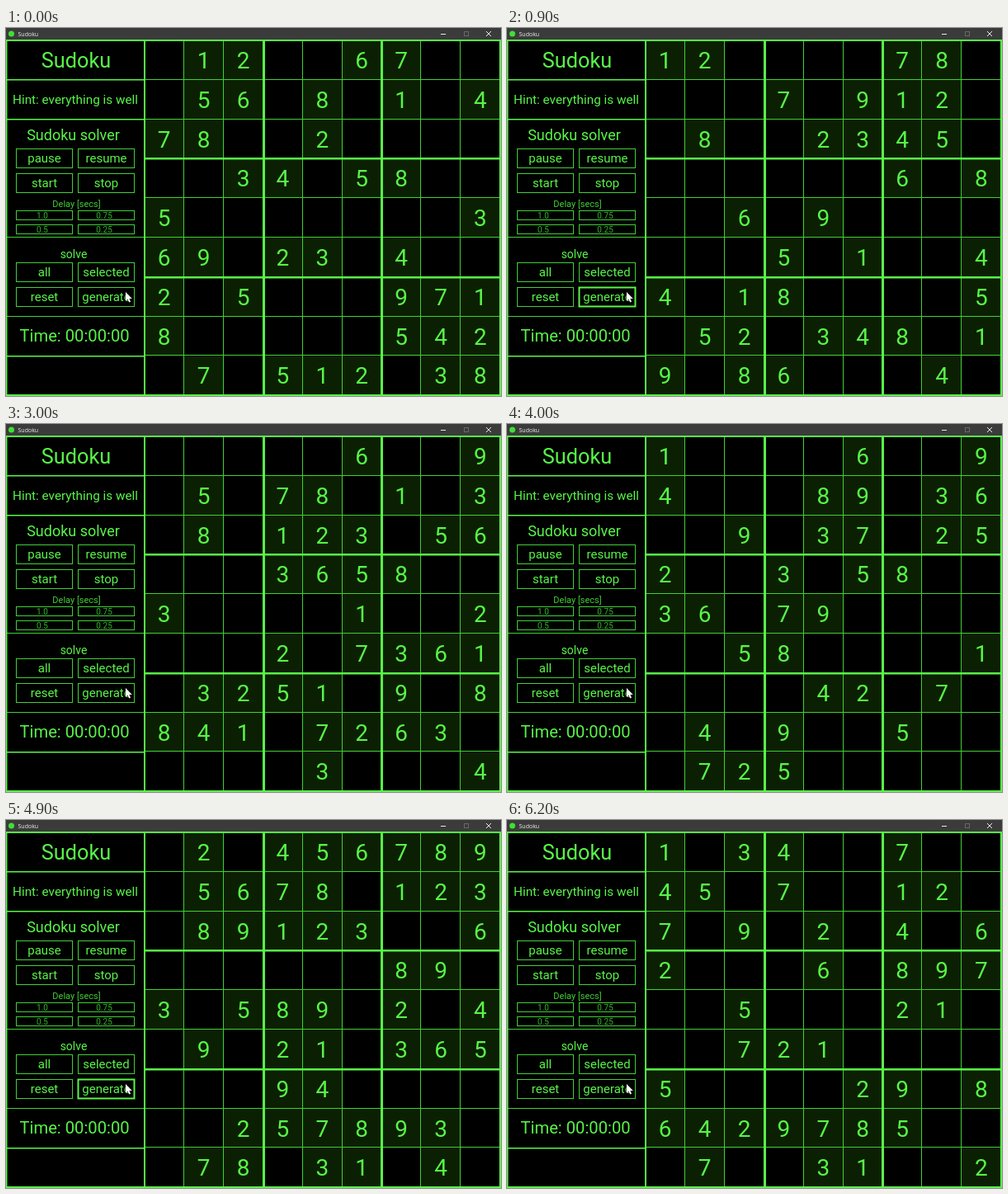
Animation of 600x446 px, one loop 6300 ms. Source, as an HTML page with a canvas:

```html
<!DOCTYPE html>
<html lang="en">
<head>
<meta charset="utf-8">
<title>Sudoku</title>
<style>
  html, body { margin: 0; width: 100%; height: 100%; overflow: hidden; background: #000; }
  canvas { display: block; }
</style>
</head>
<body>
<canvas id="stage" width="600" height="446"></canvas>
<script>
const ctx = document.getElementById('stage').getContext('2d');

const LOOP = 6300;
const BRIGHT = '#58f548';
const LINE = '#41cf36';
const DIM = '#35b42c';
const GIVEN = '#0b2002';

const LEFT = 168, TOP = 15, CELL_W = 47.9, CELL_H = 47.8;

// Each game starts at `start`; the generate button is held from `press` to `release`.
const games = [
  { start: 0, press: -1, release: -1, rows:
    '012006700 056080104 780020000 003405800 500000003 690230400 205000971 800000542 070512038' },
  { start: 900, press: 800, release: 1000, rows:
    '120000780 000709120 080023450 000000608 006090000 000501004 401800005 052034801 908600040' },
  { start: 2400, press: 2200, release: 2500, rows:
    '000006009 050780103 080123056 000365800 300001002 000207361 032510908 841072630 000030004' },
  { start: 3900, press: 3700, release: 4000, rows:
    '100006009 400089036 009037025 200305800 360790000 005800001 000042070 040900500 072500000' },
  { start: 4900, press: 4800, release: 5000, rows:
    '020456789 056780123 089123006 000000890 305890204 090210365 000940000 002578930 078031040' },
  { start: 5800, press: 5700, release: 5900, rows:
    '103400700 450700120 709020406 200060897 005000210 007210000 500002908 642978500 070031002' }
];
for (const game of games) game.rows = game.rows.split(' ');

function rect(x, y, w, h, color) {
  ctx.fillStyle = color;
  ctx.fillRect(x, y, w, h);
}

function text(str, x, y, size, color = BRIGHT, align = 'center', font = 'Roboto, sans-serif') {
  ctx.font = `${size}px ${font}`;
  ctx.textAlign = align;
  ctx.fillStyle = color;
  ctx.fillText(str, x, y);
}

function frame(x, y, w, h, color, width = 1) {
  ctx.strokeStyle = color;
  ctx.lineWidth = width;
  ctx.strokeRect(x + 0.5, y + 0.5, w, h);
}

function path(points, color, close) {
  ctx.beginPath();
  points.forEach(([x, y]) => ctx.lineTo(x, y));
  if (close) ctx.closePath();
  ctx.strokeStyle = color;
  ctx.lineWidth = 1;
  ctx.stroke();
}

function button(label, col, y, held) {
  const x = col ? 87 : 12;
  frame(x, y, 68, 23, held ? BRIGHT : LINE, held ? 2 : 1);
  text(label, x + 34.5, y + 16.5, 15);
}

function delayButton(label, col, y) {
  const x = col ? 87 : 12;
  frame(x, y, 68, 11, LINE);
  text(label, x + 32, y + 9.5, 10, DIM);
}

function drawTitleBar() {
  rect(0, 0, 600, 14, '#3b3b3b');
  ctx.fillStyle = '#3fe034';
  ctx.beginPath();
  ctx.arc(6.5, 7, 3.5, 0, 2 * Math.PI);
  ctx.fill();
  text('Sudoku', 14.5, 9.5, 7, '#f0f0f0', 'left', '"Open Sans", sans-serif');
  rect(527, 7, 6, 1, '#e8e8e8');
  frame(555, 4, 5, 5, '#686868');
  path([[582, 4], [588, 10]], '#f0f0f0');
  path([[588, 4], [582, 10]], '#f0f0f0');
}

function drawPanel(seconds, held) {
  text('Sudoku', 85, 47.5, 25.3);
  text('Hint: everything is well', 84, 92, 15.3);
  text('Sudoku solver', 81.5, 135.5, 18);

  button('pause', 0, 146);
  button('resume', 1, 146);
  button('start', 0, 176);
  button('stop', 1, 176);

  text('Delay [secs]', 85.5, 216.5, 11, LINE);
  delayButton('1.0', 0, 221);
  delayButton('0.75', 1, 221);
  delayButton('0.5', 0, 238);
  delayButton('0.25', 1, 238);

  text('solve', 82, 279, 14);
  button('all', 0, 284);
  button('selected', 1, 284);
  button('reset', 0, 314);
  button('generate', 1, 314, held);

  text('Time: 00:00:' + String(seconds).padStart(2, '0'), 16.5, 380, 20.2, BRIGHT, 'left');

  for (const y of [62, 110, 397]) rect(0, y, LEFT, 1.5, BRIGHT);
  for (const y of [253, 349]) rect(0, y, LEFT, 1, LINE);
  rect(0, 14, 1.5, 432, BRIGHT);
}

function drawBoard(rows) {
  rows.forEach((row, r) => [...row].forEach((digit, c) => {
    if (digit === '0') return;
    const x = LEFT + c * CELL_W, y = TOP + r * CELL_H;
    rect(x, y, CELL_W, CELL_H, GIVEN);
    text(digit, x + 23.7, y + 34, 28);
  }));

  for (const thick of [false, true]) {
    for (let i = 0; i <= 9; i++) {
      if ((i % 3 === 0) !== thick) continue;
      const x = Math.round(LEFT + i * CELL_W), y = Math.round(TOP + i * CELL_H);
      const color = thick ? BRIGHT : LINE;
      const inner = i === 3 || i === 6;
      const width = inner ? 3 : thick ? 2 : 1;
      rect(x - 1, 14, width, 432, color);
      rect(LEFT, y - 1, 432, inner ? 2.5 : width, color);
    }
  }
  rect(0, 14, 600, 2, BRIGHT);
  rect(0, 444, 600, 2, BRIGHT);
}

function drawCursor() {
  const shape = [[0, 0], [0, 11], [2.5, 8.7], [4.2, 12.5], [6, 11.7], [4.4, 8], [7.8, 8]];
  const points = shape.map(([x, y]) => [145 + x, 320 + y]);
  path(points, '#000', true);
  ctx.fillStyle = '#fff';
  ctx.fill();
}

function draw(now) {
  const t = Math.floor((now % LOOP) / 100) * 100;
  const game = games.filter(g => g.start <= t).pop();
  const held = games.some(g => t >= g.press && t < g.release);

  rect(0, 0, 600, 446, '#000');
  drawTitleBar();
  drawPanel(Math.floor((t - game.start) / 1000), held);
  drawBoard(game.rows);
  drawCursor();
}

const begin = performance.now();
function tick() {
  draw(performance.now() - begin);
  requestAnimationFrame(tick);
}
tick();
</script>
</body>
</html>
```
